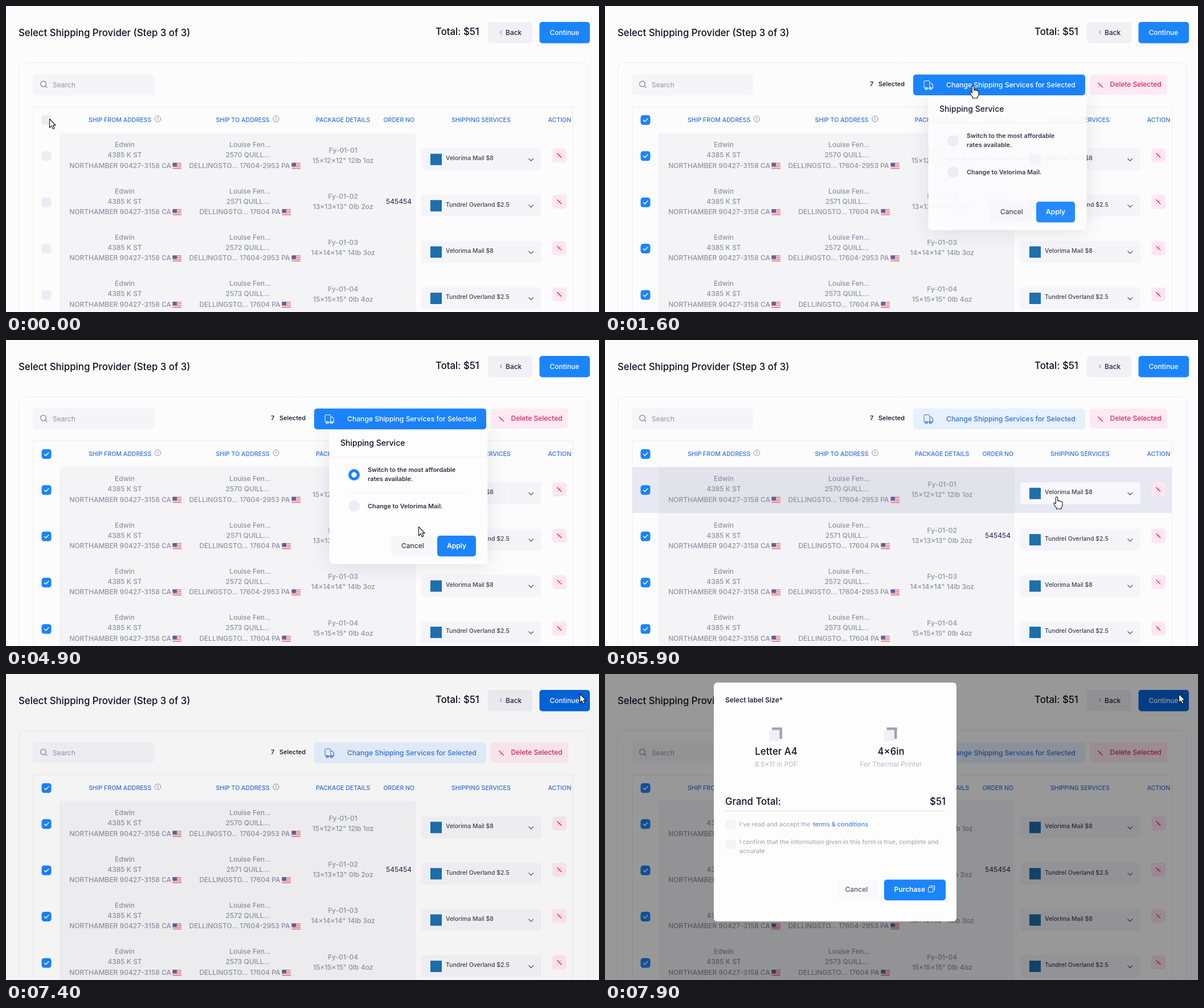
An HTML page with a canvas that plays this animation: 1041x538 px, repeating every 8000 ms.

```html
<!DOCTYPE html>
<html lang="en">
<head>
<meta charset="utf-8">
<title>Select Shipping Provider</title>
<style>
html, body { margin: 0; width: 100%; height: 100%; overflow: hidden; background: #fcfcfd; }
canvas { display: block; width: 1041px; height: 538px; }
</style>
</head>
<body>
<canvas id="stage" width="1041" height="538"></canvas>
<script>
const ctx = document.getElementById('stage').getContext('2d');
const W = 1041, H = 538, LOOP = 8000, STEP = 100;
const BLUE = '#1b84ff', INK = '#0d0f24', MUTED = '#9092a1', LINK = '#3473dc', RED = '#d8265f';
const FIELD = '#f5f5f9', SOFT = '#ececf4', PAGE = '#fcfcfc';
const ROW_TOP = 223.3, ROW_H = 81.4;

const rows = [
  { zip: '17604-2953', pack: '15×12×12" 12lb 1oz', fast: true },
  { zip: '17604', pack: '13×13×13" 0lb 2oz', order: '545454' },
  { zip: '17604-2953', pack: '14×14×14" 14lb 3oz', fast: true },
  { zip: '17604', pack: '15×15×15" 0lb 4oz' }
];

// time, x, y of the pointer tip
const path = [
  [0, 76, 198], [500, 76, 198], [1400, 646, 140], [2000, 646, 140],
  [3100, 612, 240], [3700, 612, 240], [4100, 616, 240], [4900, 724, 328],
  [5200, 790, 362], [5400, 790, 362], [5900, 793, 275], [6100, 793, 275],
  [6900, 1007, 34.5], [LOOP, 1007, 34.5]
];
const CHECK_AT = 300, OPEN_AT = 1420, RADIO_AT = 3500, CLOSE_AT = 5400, DIM_AT = 7388, MODAL_AT = 7500;

const clamp = v => Math.min(1, Math.max(0, v));
const ramp = (t, start, length) => clamp((t - start) / length);
const smooth = v => v * v * (3 - 2 * v);

function pointerAt(t) {
  const i = Math.max(1, path.findIndex(p => p[0] > t));
  const a = path[i - 1], b = path[i];
  const k = smooth(ramp(t, a[0], b[0] - a[0]));
  return { x: a[1] + (b[1] - a[1]) * k, y: a[2] + (b[2] - a[2]) * k };
}

const inside = (p, x, y, w, h) => p.x >= x && p.x < x + w && p.y >= y && p.y < y + h;

function box(x, y, w, h, r, fill, stroke) {
  ctx.beginPath();
  ctx.roundRect(x, y, w, h, r);
  if (fill) { ctx.fillStyle = fill; ctx.fill(); }
  if (stroke) { ctx.strokeStyle = stroke; ctx.lineWidth = 1; ctx.stroke(); }
}

function disc(x, y, r, fill) {
  ctx.beginPath();
  ctx.arc(x, y, r, 0, 7);
  ctx.fillStyle = fill;
  ctx.fill();
}

function ring(x, y, r, color, width) {
  ctx.beginPath();
  ctx.arc(x, y, r, 0, 7);
  ctx.strokeStyle = color;
  ctx.lineWidth = width;
  ctx.stroke();
}

function line(points, color, width = 1) {
  ctx.beginPath();
  for (let i = 0; i < points.length; i += 2) ctx.lineTo(points[i], points[i + 1]);
  ctx.strokeStyle = color;
  ctx.lineWidth = width;
  ctx.lineCap = ctx.lineJoin = 'round';
  ctx.stroke();
}

// y is the middle of the capital letters
function text(str, x, y, size, color, weight = 500, align = 'left') {
  ctx.font = `${weight} ${size}px Inter, sans-serif`;
  ctx.textAlign = align;
  ctx.fillStyle = color;
  ctx.fillText(str, x, y + size * 0.363);
}

function cross(x, y, r) {
  line([x + r, y - r, x - r, y + r], '#ee8fb0', 1);
  line([x - r, y - r, x + r, y + r], RED, 1.3);
}

function checkbox(x, y, on) {
  box(x - 8, y - 8, 17, 17, 4.5, on ? BLUE : SOFT);
  if (on) line([x - 3, y + 0.8, x - 0.5, y + 3.2, x + 4.3, y - 2], '#fff', 1.5);
}

function radio(x, y, on) {
  disc(x, y, 10, on ? BLUE : SOFT);
  if (on) disc(x, y, 4.7, '#fff');
}

function info(x, y) {
  ring(x, y, 5.2, '#90909c', 1);
  line([x, y - 2.5, x, y + 0.4], '#90909c', 1.1);
  disc(x, y + 2.5, 0.7, '#90909c');
}

function flag(x, y) {
  ctx.globalAlpha *= 0.8;
  for (let i = 0; i < 7; i++) {
    ctx.fillStyle = i % 2 ? '#f6eef0' : '#dc4654';
    ctx.fillRect(x, y - 5 + i * 1.5, 15.5, 1.5);
  }
  ctx.fillStyle = '#3c4c96';
  ctx.fillRect(x, y - 5, 7.5, 6);
  ctx.globalAlpha /= 0.8;
}

function truck(x, y, color) {
  box(x - 7, y - 7.5, 10, 13, 2, null, color);
  line([x + 3, y - 3.5, x + 6, y - 3.5, x + 8.5, y + 0.5, x + 8.5, y + 5.5, x - 4, y + 5.5], color, 1.2);
  for (const dx of [-3, 4.5]) ring(x + dx, y + 6, 2, color, 1.2);
}

function header(p) {
  text('Select Shipping Provider (Step 3 of 3)', 22, 47, 16.8, INK);
  text('Total: $51', 754, 44.5, 16.8, INK);
  box(846, 28, 78, 37.5, 5, '#f1f1f5');
  line([870, 43.5, 867.3, 46.2, 870, 49], '#55566a', 1);
  text('Back', 877, 47, 12, '#252638');
  box(936.5, 28, 88.5, 37.5, 5, inside(p, 937, 28, 88, 37) ? '#0464dd' : BLUE);
  text('Continue', 954.5, 47, 12, '#fff');
}

function toolbar(p, checked, open) {
  box(47, 120, 213, 37, 5, FIELD);
  ring(65.5, 137, 4.9, '#81839a', 1.2);
  line([69.2, 140.7, 72, 143.4], '#81839a', 1.2);
  text('Search', 82, 139, 12, '#92949f', 400);
  if (!checked) return;
  text('7', 465, 137.5, 11, INK);
  text('Selected', 480, 137.5, 11, INK);
  const active = open || inside(p, 541, 120, 302, 37);
  const color = active ? '#fff' : LINK;
  box(541, 120.5, 302, 36.5, 5, active ? BLUE : '#e6f1fe');
  truck(567, 139, color);
  text('Change Shipping Services for Selected', 599, 139, 12.15, color);
  box(851, 120.5, 136, 35.5, 5, '#ffeaf3');
  cross(869.5, 139, 3.8);
  text('Delete Selected', 886.5, 138, 12, RED);
}

function tableRow(row, i, p, checked, open) {
  const y = ROW_TOP + i * ROW_H;
  const hover = !open && inside(p, 48, y, 947, ROW_H);
  if (hover) {
    ctx.fillStyle = '#e8e8f3';
    ctx.fillRect(48, y, 947, ROW_H - 0.7);
  }
  ctx.fillStyle = hover ? '#e2e2eb' : '#f4f4f7';
  ctx.fillRect(94, y, 625, ROW_H);
  checkbox(70.5, y + 40, checked);

  text('Edwin', 208.5, y + 20.5, 12, MUTED, 500, 'center');
  text('4385 K ST', 208.5, y + 38.5, 12, MUTED, 500, 'center');
  text('NORTHAMBER 90427-3158 CA', 290, y + 57, 12, MUTED, 500, 'right');
  flag(292.5, y + 57.5);

  const end = row.zip.length > 5 ? 498.5 : 481.5;
  text('Louise Fen...', 428.5, y + 20.5, 12, MUTED, 500, 'center');
  text(`${2570 + i} QUILL...`, 424.5, y + 38.5, 12, MUTED, 500, 'center');
  text(`DELLINGSTO... ${row.zip} PA`, end, y + 57, 12, MUTED, 500, 'right');
  flag(end + 3, y + 57.5);

  text(`Fy-01-0${i + 1}`, 591.7, y + 30, 12.1, MUTED, 500, 'center');
  text(row.pack, 591.7, y + 48, 12.1, MUTED, 500, 'center');
  if (row.order) text(row.order, 689.5, y + 39, 12.1, '#202150', 400, 'center');

  box(729, y + 27, 211, 38.5, 5, hover ? '#f8f8fb' : FIELD);
  box(745, y + 36.5, 20, 20, 0, '#1d70ad');
  text(row.fast ? 'Velorima Mail $8' : 'Tundrel Overland $2.5', 772, y + 44, 10.5, '#41424f');
  line([917.8, y + 45.2, 921.7, y + 49, 925.6, y + 45.2], '#5b5c6b', 1.3);
  box(959, y + 27, 25, 25, 5, '#ffe7f1');
  cross(971.3, y + 39.5, 3.5);
}

function table(p, checked, open) {
  box(48.5, 177.5, 946.5, 420, 0, null, '#ededf3');
  checkbox(70.5, 200, checked);
  const heads = [
    ['SHIP FROM ADDRESS', 145], ['SHIP TO ADDRESS', 368.5], ['PACKAGE DETAILS', 544],
    ['ORDER NO', 662.5], ['SHIPPING SERVICES', 782], ['ACTION', 951.5]
  ];
  for (const [label, x] of heads) text(label, x, 200, 10.55, LINK);
  info(266.5, 198.5);
  info(474, 198.5);
  rows.forEach((row, i) => tableRow(row, i, p, checked, open));
}

function popup(alpha, chosen) {
  ctx.save();
  ctx.globalAlpha = alpha;
  ctx.shadowColor = 'rgba(60, 60, 100, .13)';
  ctx.shadowBlur = 34;
  ctx.shadowOffsetY = 4;
  box(567.5, 157.5, 278, 236.5, [0, 0, 6, 6], '#fdfdfe');
  ctx.shadowColor = 'transparent';
  text('Shipping Service', 587, 181, 14, INK);
  line([568, 206, 845, 206], '#ebebf2');
  radio(611, 237, chosen);
  text('Switch to the most affordable', 635, 228, 10.9, '#2e3044', 600);
  text('rates available.', 635, 244, 10.9, '#2e3044', 600);
  ctx.setLineDash([3, 3]);
  line([602, 268.5, 811, 268.5], '#e7e7ef');
  ctx.setLineDash([]);
  radio(611, 292, false);
  text('Change to Velorima Mail.', 635, 292, 10.9, '#2e3044', 600);
  box(676, 344, 75, 36.5, 5, '#f7f7fa');
  text('Cancel', 694, 362, 12, '#3c3e50');
  box(757, 344, 68, 36.5, 5, BLUE);
  text('Apply', 774, 362, 12, '#fff', 600);
  ctx.restore();
}

function sizeOption(x, name, note) {
  box(x - 12, 99, 19, 19, 2, '#f0f0f5');
  ctx.fillStyle = '#a2a2b2';
  ctx.fillRect(x - 7, 94, 18, 4.5);
  ctx.fillRect(x + 6.5, 94, 4.5, 20);
  text(name, x + 0.5, 136, 16.8, INK, 500, 'center');
  text(note, x + 0.5, 159, 12, '#b9bac6', 400, 'center');
}

function modal(k) {
  ctx.save();
  ctx.globalAlpha = k;
  ctx.translate(0, -50 * (1 - smooth(k)));
  box(191, 15, 426, 420, 6, '#fdfdfe');
  text('Select label Size*', 211, 46, 12, '#25263a', 600);
  sizeOption(300, 'Letter A4', '8.5×11 in PDF');
  sizeOption(501.5, '4×6in', 'For Thermal Printer');
  text('Grand Total:', 211, 223.5, 16.8, INK);
  text('$51', 598, 223.5, 16.8, INK, 500, 'right');
  line([211, 241, 598, 241], '#dedee4');
  for (const y of [256, 291]) box(212, y, 18, 18, 4, '#f5f5f9');
  text("I've read and accept the", 236, 264, 10.8, '#a9abb8');
  text('terms & conditions', 365, 264, 10.9, '#4a86ea');
  text('I confirm that the information given in this form is true, complete and', 236, 295.5, 10.7, '#a9abb8');
  text('accurate', 236, 311, 10.7, '#a9abb8');
  box(409, 361.5, 70, 36.5, 5, '#fafafc');
  text('Cancel', 421.5, 379, 12, '#5a5c6c');
  box(490, 361.5, 108, 36.5, 5, BLUE);
  text('Purchase', 507.5, 379, 12, '#fff', 600);
  box(567.5, 375, 8.5, 8.5, 1, null, '#fff');
  line([570, 372.5, 578.5, 372.5, 578.5, 380], '#fff', 1.1);
  ctx.restore();
}

function outlined(shape) {
  ctx.fillStyle = '#fff';
  ctx.strokeStyle = '#111';
  ctx.lineWidth = 1.1;
  ctx.lineJoin = 'round';
  ctx.fill(shape);
  ctx.stroke(shape);
}

const arrow = new Path2D('M.5 .5V16L4 12.6 6.4 18 9 16.8 6.6 11.6H11.2Z');
const hand = new Path2D('M-1.7 2Q0 -.5 1.7 2V8Q3.5 6.5 4.7 8.4 6.4 7.4 7.4 9.2 9.7 8.4 10 11V16Q9.6 18 8 19.5V22H-.5V20Q-3.5 17 -5 13.5C-6 11 -3.8 10.2 -1.7 13Z');

function pointer(p, overButton) {
  ctx.save();
  ctx.translate(p.x, p.y);
  outlined(overButton ? hand : arrow);
  ctx.restore();
}

function draw(t) {
  const p = pointerAt(t);
  const checked = t >= CHECK_AT;
  const open = t >= OPEN_AT && t <= CLOSE_AT;
  const shown = ramp(t, OPEN_AT, 190) * (1 - ramp(t, CLOSE_AT, 100));
  const dim = 0.4 * ramp(t, DIM_AT, 150);
  const slide = ramp(t, MODAL_AT, 350);

  ctx.fillStyle = PAGE;
  ctx.fillRect(0, 0, W, H);
  box(22.5, 99.5, 998.5, 480, 11, null, '#ececf3');
  header(p);
  toolbar(p, checked, open);
  table(p, checked, open);
  if (shown > 0) popup(shown, t >= RADIO_AT);
  if (dim > 0) {
    ctx.fillStyle = `rgba(0, 0, 0, ${dim})`;
    ctx.fillRect(0, 0, W, H);
  }
  if (slide > 0) modal(slide);

  const overButton = checked && inside(p, 541, 120, 302, 37)
    || open && inside(p, 757, 344, 68, 36)
    || !open && rows.some((_, i) => inside(p, 729, ROW_TOP + i * ROW_H + 27, 211, 38));
  pointer(p, overButton);
}

const start = performance.now();
function tick() {
  const t = (performance.now() - start) % LOOP;
  draw(Math.floor(t / STEP) * STEP);
  requestAnimationFrame(tick);
}
tick();
</script>
</body>
</html>
```
